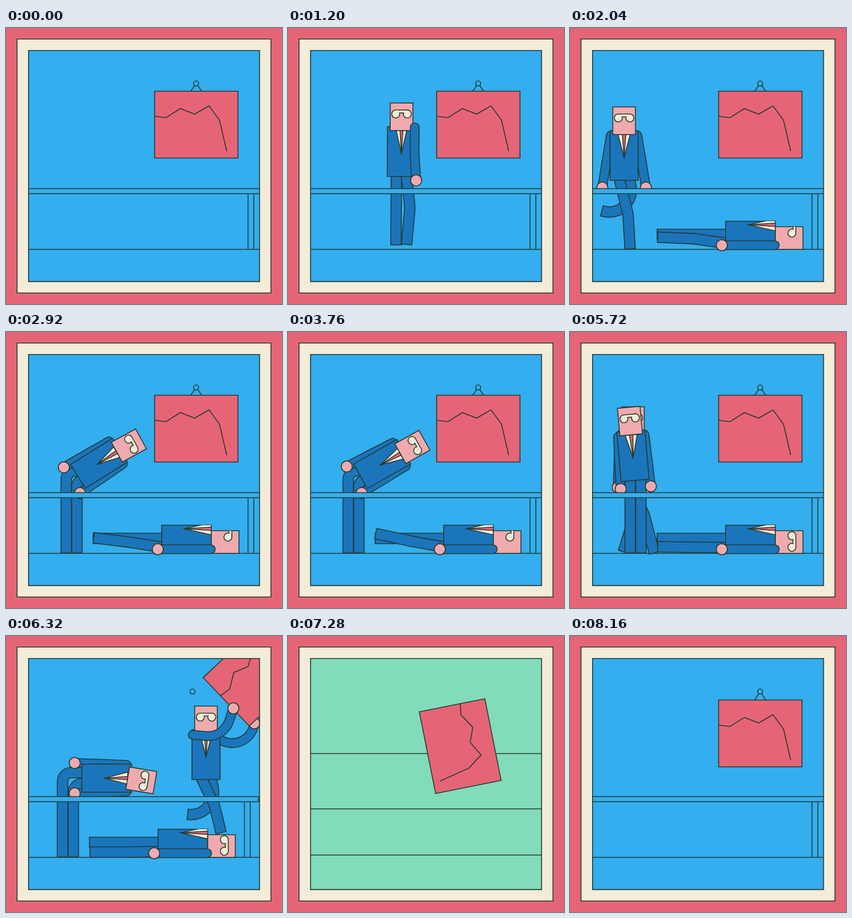
An HTML page with a canvas that plays this animation: 500x500 px, repeating every 8200 ms.

```html
<!DOCTYPE html>
<html lang="en">
<head>
<meta charset="utf-8">
<title>Office</title>
<style>
html, body { margin: 0; width: 100%; height: 100%; overflow: hidden; background: #e56576; }
canvas { display: block; width: 500px; height: 500px; }
</style>
</head>
<body>
<canvas id="stage"></canvas>
<script>
const LOOP = 8200;
const RED = '#e56576', CREAM = '#f2ecd9', BLUE = '#33aeee', GREEN = '#82dbb9';
const SUIT = '#1b75bb', SKIN = '#f0aaad', INK = '#24382f', LINE = 1.6;

const canvas = document.getElementById('stage');
const c = canvas.getContext('2d');
const dpr = window.devicePixelRatio || 1;
canvas.width = canvas.height = 500 * dpr;

const clamp = (v, lo = 0, hi = 1) => Math.min(hi, Math.max(lo, v));
const mix = (a, b, k) => a + (b - a) * k;
const mixPoint = (p, q, k) => [mix(p[0], q[0], k), mix(p[1], q[1], k)];
const span = (t, from, to) => clamp((t - from) / (to - from));
const smooth = u => u * u * (3 - 2 * u);
const easeOut = u => 1 - (1 - u) ** 2;
const rad = deg => deg * Math.PI / 180;

// Smooth interpolation through [time, value] pairs.
function keys(t, list) {
  if (t <= list[0][0]) return list[0][1];
  for (let i = 1; i < list.length; i++) {
    const [t0, a] = list[i - 1], [t1, b] = list[i];
    if (t <= t1) return mix(a, b, smooth((t - t0) / (t1 - t0)));
  }
  return list[list.length - 1][1];
}

function paint(fill) {
  if (fill) { c.fillStyle = fill; c.fill(); }
  c.lineWidth = LINE;
  c.strokeStyle = INK;
  c.stroke();
}

function box(x, y, w, h, fill) {
  c.beginPath();
  c.rect(x, y, w, h);
  paint(fill);
}

function poly(points, fill, close = true) {
  c.beginPath();
  points.forEach(p => c.lineTo(...p));
  if (close) c.closePath();
  paint(fill);
}

const line = (x0, y0, x1, y1) => poly([[x0, y0], [x1, y1]], null, false);

function disc(x, y, r, fill) {
  c.beginPath();
  c.arc(x, y, r, 0, 7);
  paint(fill);
}

// An outlined tube bent at its middle point.
function limb([a, b, d], width, radius, cap) {
  const reach = Math.min(Math.hypot(a[0] - b[0], a[1] - b[1]), Math.hypot(d[0] - b[0], d[1] - b[1]));
  const turn = Math.atan2(a[1] - b[1], a[0] - b[0]) - Math.atan2(d[1] - b[1], d[0] - b[0]);
  const r = Math.min(radius, reach * Math.abs(Math.tan(turn / 2)) * 0.95);
  const trim = cap === 'butt' ? LINE : 0;
  c.lineCap = cap;
  for (const inner of [0, 1]) {
    const len = Math.hypot(d[0] - b[0], d[1] - b[1]) || 1;
    const end = mixPoint(d, b, inner * trim / len);
    c.beginPath();
    c.moveTo(...a);
    c.arcTo(...b, ...end, r);
    c.lineTo(...end);
    c.lineWidth = inner ? width - LINE : width + LINE;
    c.strokeStyle = inner ? SUIT : INK;
    c.stroke();
  }
  c.lineCap = 'butt';
}

const leg = (points, radius = 16) => limb(points, 19, radius, 'butt');

function arm(points) {
  limb(points, 16, 40, 'round');
  disc(...points[2], 10, SKIN);
}

// Maps body coordinates (hip at zero, head upwards) to the room.
const placer = (hip, deg) => (x, y) => {
  const s = Math.sin(rad(deg)), k = Math.cos(rad(deg));
  return [hip[0] + x * k - y * s, hip[1] + x * s + y * k];
};

function hangingArm(at, side, spread = 0, x = 24) {
  const hand = [side * (x + 3.5 + spread), 13];
  arm([at(side * x, -81), at(side * (x + 2 + spread / 2), -34), at(...hand)]);
}

function glasses(x, y, open) {
  c.save();
  c.translate(x, y);
  c.scale(1, open);
  c.beginPath();
  c.rect(-10.5, -6.4, 21, 3.6);
  for (const side of [-1, 1]) {
    c.moveTo(side * 10.5 + 6.4, 0);
    c.arc(side * 10.5, 0, 6.4, 0, 7);
  }
  c.lineWidth = LINE * 2;
  c.strokeStyle = INK;
  c.stroke();
  c.fillStyle = CREAM;
  c.fill();
  c.restore();
}

function body(hip, deg, { shirt = 0, head = [0, 0], nod = 0, look = 0, open = 1 } = {}) {
  c.save();
  c.translate(...hip);
  c.rotate(rad(deg));
  box(-25.5, -90, 51, 90, SUIT);
  c.save();
  c.beginPath();
  c.rect(-25.5, -90, 51, 90);
  c.clip();
  const top = shirt ? -90 : -83;
  poly([[shirt - 11, top], [shirt + 11, top], [shirt, -41]], CREAM);
  poly([[shirt - 3, top], [shirt + 3, top], [shirt, -41]], RED);
  c.restore();
  c.translate(head[0], head[1] - 83);
  c.rotate(rad(nod));
  box(-20.5, -50, 41, 50, SKIN);
  c.beginPath();
  c.rect(-20.5, -50, 41, 50);
  c.clip();
  glasses(look, -30, open);
  c.restore();
}

function walk([x, y], phase, amount, floor = 401) {
  return [1, -1].map(side => {
    const p = phase + (side < 0 ? Math.PI : 0);
    const kick = Math.max(0, Math.sin(p)) * amount;
    const planted = [x + mix(side * 10, 11 + 28 * Math.cos(p), amount), floor];
    const start = [x + side * 9, y - 4];
    const knee = mixPoint(start, planted, 0.5);
    return [
      start,
      mixPoint([knee[0] + 6 * amount, knee[1]], [x + 28, y + 74], kick),
      mixPoint(planted, [x - 41, y + 55], kick)
    ];
  });
}

function fallingMan(t) {
  if (t < 20) return;
  const fall = span(t, 1180, 1560) ** 2;
  const hip = [mix(mix(-40, 205, easeOut(span(t, 0, 560))), 282, fall), mix(268.5, 375.5, fall)];
  const deg = 90 * fall;
  const at = placer(hip, deg);
  const open = 1 - 0.9 * clamp(1 - Math.abs(t - 870) / 60);

  if (fall === 0) {
    walk(hip, 6 - t * 0.012, 1 - smooth(span(t, 320, 560))).forEach(p => leg(p, 40));
    hangingArm(at, -1);
    hangingArm(at, 1);
    body(hip, deg, { open });
    return;
  }
  const lift = keys(t, [[1560, 0], [2040, 12.5], [2700, 22], [3300, 12], [3760, 26.5],
    [4350, 14], [4960, 26.5], [5900, 0]]);
  const bend = keys(t, [[1560, 0], [2040, 4], [2700, 2], [3760, 0], [4960, 4], [5900, 0]]);
  leg([at(-mix(9, 1.5, fall), -4), at(-mix(9, 1.5, fall), 60), at(-mix(9, 1.5, fall), 125)]);
  leg([at(mix(9, 15, fall), -4), at(16 - lift * 0.46 - bend, 57), at(mix(10, 16, fall) - lift, 124)], 60);
  const belly = keys(t, [[4200, 0], [4700, 1], [5200, 1], [5600, 0]]);
  if (belly) disc(...at(-25.5 - mix(-12, 1.5, belly), -27), 10, SKIN);
  const turned = smooth(span(t, 3760, 4440));
  body(hip, deg, {
    shirt: -19 * fall,
    head: [5 * fall, -7 * fall],
    look: mix(-19.5, -1, turned) * fall
  });
  const side = mix(24, 18, fall);
  arm([at(side, -89), at(side, -40), at(mix(27, 18, fall), 7)]);
}

function bangingMan(t) {
  if (t < 1380) return;
  const settled = smooth(span(t, 2040, 2480));
  const cycle = (t - 2300) % 1200;
  let deg = 0, nod = 0;
  if (t >= 2750) {
    const down = span(cycle, 0, 340) ** 1.4;
    const up = smooth(span(cycle, 500, 1000));
    deg = mix(mix(-5, 90, down), -5, up);
    nod = 9.5 * smooth(span(cycle, 300, 400)) * (1 - smooth(span(cycle, 500, 700)));
    if (t < 3500) deg *= smooth(span(t, 2750, 3000));
  }
  const k = Math.max(0, deg) / 90;
  const walkX = mix(-45, 98, easeOut(span(t, 1380, 2040)));
  const hip = [mix(walkX, 118, settled) + 26 * k ** 1.7,
    mix(mix(269, 276, span(t, 1800, 2040)), 269, settled) - 11.5 * k];
  const at = placer(hip, deg);
  if (t < 2480) {
    walk(hip, Math.PI / 2 - Math.min(0, t - 2040) * 0.012, 1 - settled).forEach(p => leg(p, 40));
  } else {
    for (const [side, x] of [[1, 128.5], [-1, 109]]) {
      const start = at(side * 10, -3);
      leg([start, [x, start[1] + 4 * (1 - k)], [x, 401]]);
    }
  }
  const spread = 12 * span(t, 1800, 2040) * (1 - smooth(span(t, 2450, 2800)));
  hangingArm(at, -1, spread);
  hangingArm(at, 1, spread);
  body(hip, deg, { nod });
}

function picture(x, y, deg) {
  c.save();
  c.translate(x, y);
  c.rotate(rad(deg));
  box(-75.5, -60.5, 151, 121, RED);
  poly([[-75, -15], [-55, -12.5], [-29, -29], [-3, -19], [23, -34], [42, -8], [55, 48]], null, false);
  c.restore();
}

function hook(top) {
  if (top > 104) poly([[334.5, top], [344.5, 100.5], [354.5, top]], null, false);
  disc(344.5, 100.5, 4.5, BLUE);
}

const GRAB = 5980;
const camera = t => 640 * span(t, 6240, 7040) ** 2;

// Screen pose of the picture: [x, y, degrees].
function pictureAt(t) {
  if (t < 6320) {
    const u = smooth(span(t, GRAB, 6320));
    return [mix(344.8, 460.4, u) - camera(t), mix(175, 67.2, u), -43.3 * u];
  }
  return [
    keys(t, [[6320, 453.7], [6560, 440], [7280, 312], [7840, 344.8]]),
    keys(t, [[6320, 67.2], [6700, 110], [7280, 199.5], [7860, 121.5], [8060, 183], [8200, 175]]),
    t < 7280 ? mix(-43.3, -281, span(t, 6320, 7280)) : mix(-281, -360, easeOut(span(t, 7280, 7840)))
  ];
}

function runner(t, drawPicture) {
  const running = t > 5380;
  const x = 368.5 + (t - 6320) * 0.425;
  const hip = [x, keys(t, [[6000, 268.5], [6320, 260], [6600, 268.5]])];
  const grab = smooth(span(t, 5860, 6200));
  const at = placer(hip, 0);
  const reach = (from, to) => at(...mixPoint(from, to, grab));
  const floor = keys(t, [[6000, 401], [6240, 357], [6400, 357], [6600, 401]]);

  if (running) {
    walk(hip, 2.21 - (t - 6320) * 0.012, 1, floor).forEach(p => leg(p, 50));
    arm([at(22, -75), reach([26, -34], [76, -38]), reach([27.5, 13], [87.5, -102])]);
  }
  drawPicture();
  if (!running) return;
  if (grab === 0) hangingArm(at, -1);
  body(hip, 0);
  if (grab > 0) arm([at(-24, -81), reach([-26, -34], [32, -76]), reach([-27.5, 13], [49.5, -129])]);
}

function blueRoom(t, people, drawPicture) {
  c.fillStyle = BLUE;
  c.fillRect(-20, 40, 700, 420);
  line(-20, 401, 680, 401);
  for (const x of [438.5, 449]) line(x, 300, x, 401);
  const [, y, deg] = pictureAt(t);
  hook(t < GRAB || (t > 7860 && deg === -360) ? y - 60.5 : 0);
  if (people) {
    runner(t, drawPicture);
    fallingMan(t);
    bangingMan(t);
  }
  box(-20, 291, 484, 9.2, BLUE);
}

function greenRoom() {
  c.fillStyle = GREEN;
  c.fillRect(-20, 40, 700, 420);
  for (const y of [213, 313.3, 396.7]) line(-20, y, 680, y);
}

function shifted(x, y, draw) {
  c.save();
  c.translate(x, y);
  draw();
  c.restore();
}

function render(t) {
  c.setTransform(dpr, 0, 0, dpr, 0, 0);
  c.fillStyle = RED;
  c.fillRect(0, 0, 500, 500);
  box(20, 20, 460, 460, CREAM);

  c.save();
  c.beginPath();
  c.rect(41, 41, 418, 418);
  c.clip();
  const pan = camera(t);
  const drawPicture = () => shifted(pan, 0, () => picture(...pictureAt(t)));
  if (t < 7040) {
    shifted(-pan, 0, () => {
      if (pan > 200) shifted(680, 0, greenRoom);
      blueRoom(t, true, drawPicture);
      line(680, 40, 680, 460);
    });
    if (t > 6500) picture(...pictureAt(t));
  } else {
    const drop = 420 * easeOut(span(t, 7480, 8000));
    shifted(0, drop, greenRoom);
    if (drop > 0) {
      shifted(0, drop - 420, () => {
        blueRoom(t, false);
        line(-20, 460, 680, 460);
      });
    }
    picture(...pictureAt(t));
  }
  c.restore();
  box(40.8, 40.8, 418.6, 418.6);
}

function frame(now) {
  render(now % LOOP);
  requestAnimationFrame(frame);
}
render(0);
requestAnimationFrame(frame);
</script>
</body>
</html>
```
